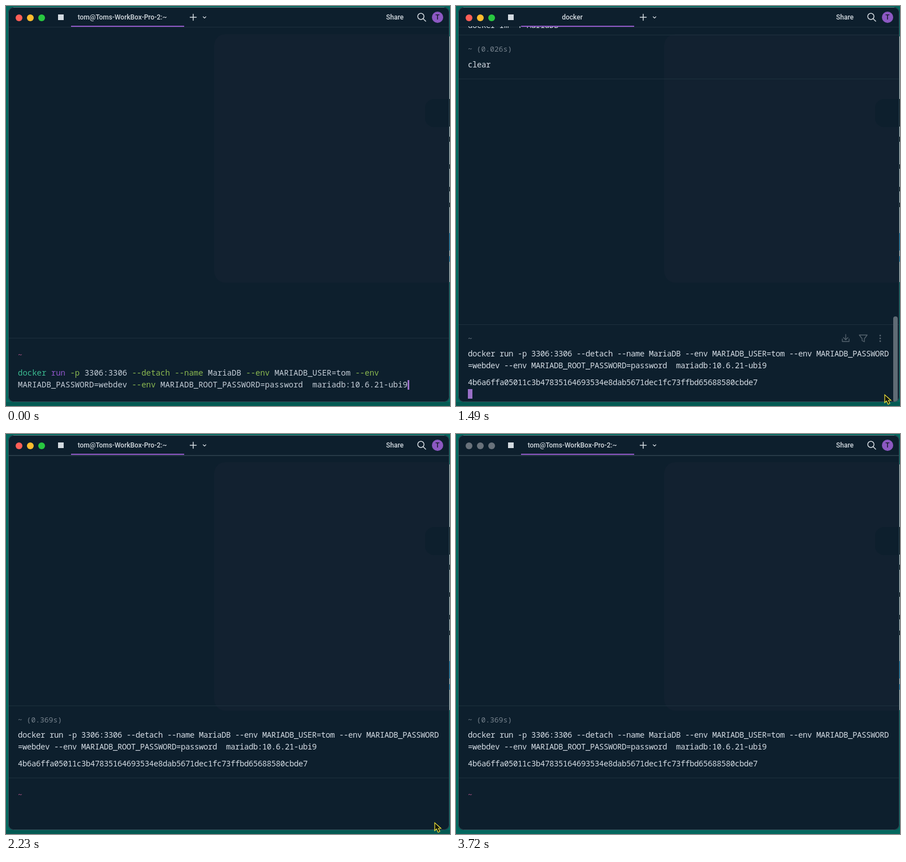
An HTML page that plays this animation: 785x710 px, repeating every 4020 ms.

```html
<!DOCTYPE html>
<html lang="en">
<head>
<meta charset="utf-8">
<title>Terminal</title>
<style>
  html, body { margin: 0; width: 100%; height: 100%; overflow: hidden; background: #04685f; }
  svg { display: block; }
  text { white-space: pre; }
  .ui { font: 500 12px Roboto, sans-serif; fill: #d3dae0; text-anchor: middle; }
  .mono { font: 14px "Noto Sans Mono", monospace; fill: #c5ced8; }
  .out { letter-spacing: -.4px; fill: #d5dde5; }
  .dim { font-size: 13px; fill: #77838e; }
  .flag { fill: #8bb950; }
  .line { fill: #1d303d; }
  .icon { fill: none; stroke: #d3dae0; stroke-width: 1.5; stroke-linecap: round; stroke-linejoin: round; }
  .faint { stroke: #56646f; stroke-width: 1.3; }
</style>
</head>
<body>
<svg width="785" height="710" viewBox="0 0 785 710">
  <defs>
    <clipPath id="frame"><rect x="4" y="2" width="780" height="701" rx="9"/></clipPath>
    <clipPath id="body"><rect x="4" y="36" width="780" height="667"/></clipPath>
  </defs>

  <!-- Desktop behind the window -->
  <rect width="785" height="710" fill="#04685f"/>
  <rect id="shade" y="703" width="785" height="7" fill="#045a53"/>
  <g>
    <path d="M784.5 54V490" stroke="#b9bfc1"/>
    <path d="M784.5 165V214M784.5 232V241M784.5 281V289M784.5 321V329M784.5 349V357" stroke="#0b1218"/>
    <path d="M784.5 403V434M784.5 444V454" stroke="#1682b4"/>
  </g>

  <g clip-path="url(#frame)">
    <rect x="4" y="2" width="780" height="701" fill="#0d1f2d"/>
    <rect x="368" y="50" width="440" height="441" rx="20" fill="#122130"/>
    <rect x="741" y="165" width="70" height="50" rx="16" fill="#0d1f2d"/>
    <rect class="line" x="5" y="37" width="779" height="1"/>

    <g clip-path="url(#body)">
      <g id="history">
        <text class="mono out" x="21" y="39">docker rm -f MariaDB</text>
        <rect class="line" x="5" y="51" width="779" height="1"/>
        <text class="mono dim" x="21" y="81">~ (0.026s)</text>
        <text class="mono out" x="21" y="109">clear</text>
        <rect class="line" x="5" y="129" width="779" height="1"/>
      </g>
      <rect id="topLine" x="5" y="38" width="779" height="1" fill="#30434f"/>

      <g id="block">
        <rect class="line" x="5" width="779" height="1"/>
        <text class="mono dim" x="21" y="30">~<tspan id="took"> (0.369s)</tspan></text>
        <text class="mono out" x="21" y="57">docker run -p 3306:3306 --detach --name MariaDB --env MARIADB_USER=tom --env MARIADB_PASSWORD</text>
        <text class="mono out" x="21" y="78">=webdev --env MARIADB_ROOT_PASSWORD=password  mariadb:10.6.21-ubi9</text>
        <text class="mono out" x="21" y="108">4b6a6ffa05011c3b47835164693534e8dab5671dec1fc73ffbd65688580cbde7</text>
      </g>

      <g id="tools">
        <path class="icon faint" d="M689 583V592M685 588.5L689 592.5L693 588.5M683 591V595.5H695V591M713 584H727L722 590.5V596L718 594V590.5Z"/>
        <g fill="#56646f">
          <circle cx="750" cy="585" r="1.4"/><circle cx="750" cy="590" r="1.4"/><circle cx="750" cy="595" r="1.4"/>
          <rect x="773" y="551" width="8" height="152" rx="4" fill="#5f6b75"/>
        </g>
      </g>
      <rect id="cell" x="21" y="680" width="8" height="17" fill="#9a70c8"/>

      <g id="prompt">
        <rect class="line" x="5" y="589" width="779" height="1"/>
        <text class="mono dim" x="21" y="624" style="fill:#c2588f">~</text>
      </g>
      <g id="typed" class="mono">
        <text x="21" y="656"><tspan fill="#3bbd92">docker</tspan> <tspan fill="#9056cb">run</tspan> <tspan class="flag">-p</tspan> 3306:3306 <tspan class="flag">--detach --name</tspan> MariaDB <tspan class="flag">--env</tspan> MARIADB_USER=tom <tspan class="flag">--env</tspan></text>
        <text x="21" y="677">MARIADB_PASSWORD=webdev <tspan class="flag">--env</tspan> MARIADB_ROOT_PASSWORD=password  mariadb:10.6.21-ubi9</text>
      </g>
      <rect id="caret" width="3" height="17" fill="#9a70c8"/>
    </g>

    <!-- Title bar -->
    <g id="lights">
      <circle cx="23" cy="21" r="6" fill="#ff5f57"/>
      <circle cx="43" cy="21" r="6" fill="#febc2e"/>
      <circle cx="63" cy="21" r="6" fill="#28c840"/>
    </g>
    <g id="grey" fill="#69727b">
      <circle cx="23" cy="21" r="6"/><circle cx="43" cy="21" r="6"/><circle cx="63" cy="21" r="6"/>
    </g>
    <rect x="92" y="15" width="10" height="10" fill="#d3dae0"/>
    <text id="title" class="ui" x="205.5" y="24"></text>
    <rect x="115" y="35" width="200" height="2" fill="#9058c6"/>
    <path class="icon" d="M325.5 20H336.5M331 14.5V25.5"/>
    <path class="icon" d="M348.5 19L351 21.5L353.5 19" style="stroke-width:1.1"/>
    <text class="ui" x="687.5" y="24">Share</text>
    <g class="icon"><circle cx="733.5" cy="18.5" r="5.5"/><path d="M737.7 22.7L742 27"/></g>
    <circle cx="763" cy="20" r="10" fill="#8c58c2"/>
    <text class="ui" x="763" y="24.3" style="fill:#141a26">T</text>
  </g>
  <rect x="4.5" y="2.5" width="779" height="700" rx="9" fill="none" stroke="#35505a"/>
  <path d="M13 2.5H775" stroke="#5d767c"/>
  <path id="pointer" d="M0 0V14L3.2 11L6 17L9 15.5L6.5 10H11Z" fill="#11150c" stroke="#f2e53a" stroke-width="1.2"/>
</svg>
<script>
const LOOP = 4020, SENT = 1340, DONE = 1640, SETTLED = 1780, BLUR = 3720;
const el = id => document.getElementById(id);
const show = (id, on) => el(id).setAttribute("visibility", on ? "visible" : "hidden");
const move = (id, x, y) => el(id).setAttribute("transform", `translate(${x} ${y})`);

function draw(t) {
  const within = (from, to) => t >= from && t < to;
  const running = within(SENT, DONE);
  const typing = t < SENT;
  const drop = t >= SETTLED ? 21 : 0;

  el("title").textContent = running ? "docker" : "tom@Toms-WorkBox-Pro-2:~";
  show("history", running);
  show("tools", running);
  show("cell", within(1490, DONE));
  show("block", !typing);
  show("took", t >= DONE);
  move("block", 0, running ? 565 : 461 + drop);
  show("topLine", t >= SETTLED);
  show("prompt", !running);
  move("prompt", 0, drop);
  show("typed", typing);

  show("caret", t < 450 || within(890, SENT) || within(DONE, 2230) || within(2670, 3120));
  move("caret", typing ? 710 : 21, typing ? 664 : 643 + drop);

  show("pointer", within(740, 2670));
  if (t < 890) move("pointer", 758, 696);
  else if (t < 2530) move("pointer", 758, 690);
  else move("pointer", 752, 698);

  show("lights", t < BLUR);
  show("grey", t >= BLUR);
  show("shade", t < BLUR);
}

const start = performance.now();
function tick() {
  draw((performance.now() - start) % LOOP);
  requestAnimationFrame(tick);
}
tick();
</script>
</body>
</html>
```
